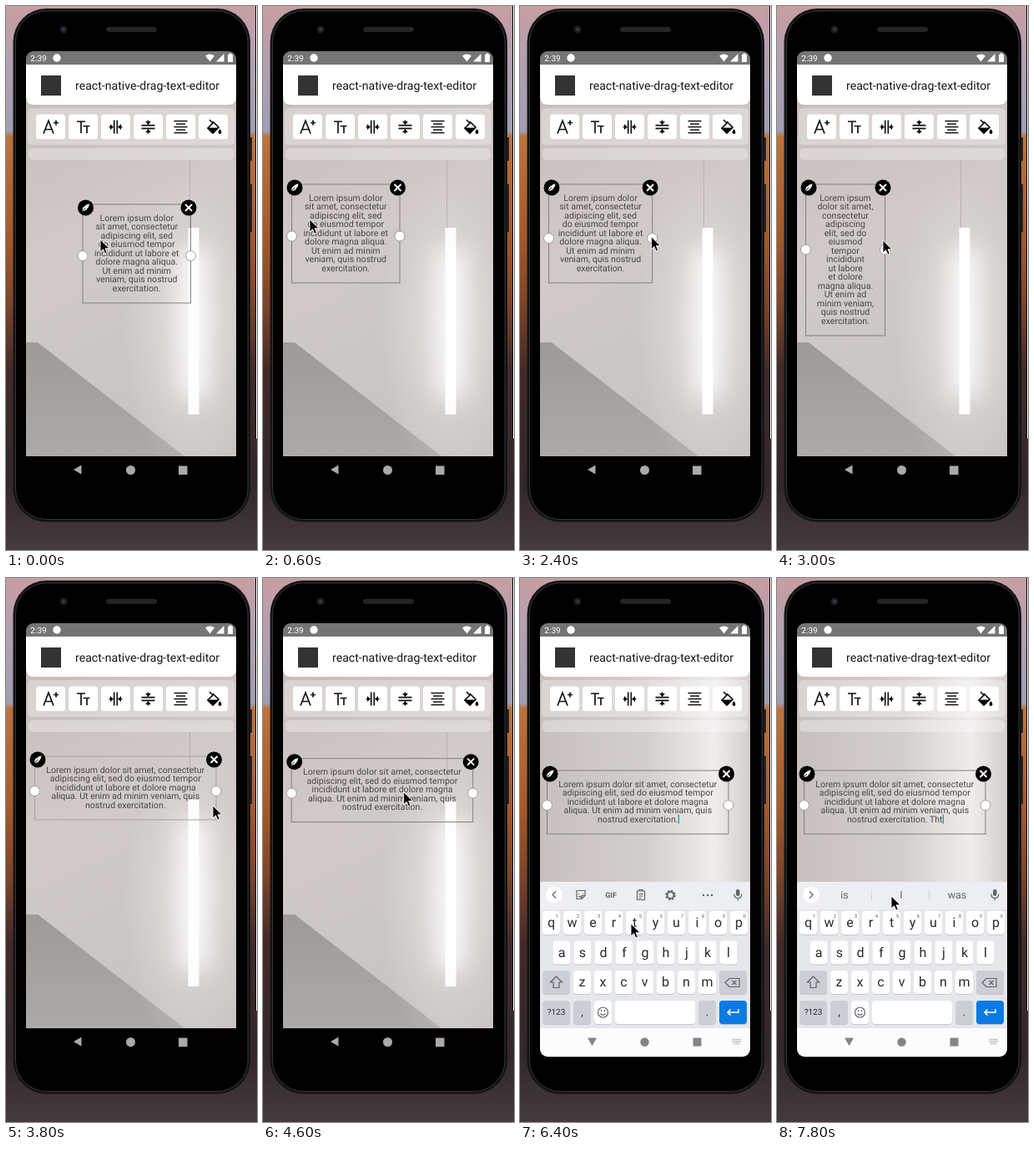
An HTML page that plays this animation: 301x650 px, repeating every 8000 ms.

```html
<!DOCTYPE html>
<html lang="en">
<head>
<meta charset="utf-8">
<title>Drag text editor</title>
<style>
html, body { margin: 0; width: 100%; height: 100%; overflow: hidden; background: #000; }
svg { display: block; width: 100vw; height: 100vh; font-family: Roboto, "Open Sans", sans-serif; }
text { text-anchor: middle; white-space: pre; text-rendering: geometricPrecision; }
#copy { font-size: 10.57px; fill: #4a4746; }
.line { fill: none; stroke: #111; stroke-width: 1.7; }
.thin { fill: none; stroke: #5f6368; stroke-width: 1.2; }
</style>
</head>
<body>
<svg viewBox="0 0 301 650" preserveAspectRatio="none">
  <defs>
    <linearGradient id="dusk" x2="0" y2="1">
      <stop offset="0" stop-color="#c79ea2"/><stop offset=".1" stop-color="#b3a0b0"/>
      <stop offset=".23" stop-color="#a09eb2"/><stop offset=".24" stop-color="#bd733c"/>
      <stop offset=".42" stop-color="#a55a2b"/><stop offset=".55" stop-color="#7c4429"/>
      <stop offset=".67" stop-color="#432a28"/><stop offset=".88" stop-color="#32272a"/>
      <stop offset="1" stop-color="#453b3d"/>
    </linearGradient>
    <linearGradient id="wall" x2=".25" y2="1">
      <stop offset="0" stop-color="#c4bcb9"/><stop offset=".5" stop-color="#d0cac8"/>
      <stop offset="1" stop-color="#c8c4c2"/>
    </linearGradient>
    <linearGradient id="wedge" x2="0" y2="1">
      <stop offset="0" stop-color="#9d9a98"/><stop offset="1" stop-color="#acaaa8"/>
    </linearGradient>
    <radialGradient id="glow">
      <stop offset="0" stop-color="#fff" stop-opacity=".45"/>
      <stop offset="1" stop-color="#fff" stop-opacity="0"/>
    </radialGradient>
    <filter id="blur" filterUnits="userSpaceOnUse" x="100" y="180" width="250" height="370">
      <feGaussianBlur stdDeviation="13"/>
    </filter>
    <linearGradient id="soft">
      <stop offset="0" stop-color="#c7c1be"/><stop offset=".5" stop-color="#d3cecc"/>
      <stop offset=".83" stop-color="#efeceb"/><stop offset="1" stop-color="#d3cecc"/>
    </linearGradient>
    <clipPath id="screen"><rect x="24" y="54" width="252" height="518" rx="9"/></clipPath>
    <clipPath id="photo"><rect x="24" y="70" width="252" height="468"/></clipPath>
  </defs>

  <rect width="301" height="650" fill="url(#dusk)"/>
  <path d="M299 0h1v517h-1z"/><path d="M300 0h1v517h-1z" fill="#fff"/>
  <path d="M292 157h3v28h-3zM292 213h3v57h-3z" fill="#222226"/>
  <rect x="8.500" y="3" width="284.500" height="613.500" rx="40" fill="#141416"/>
  <rect x="11.500" y="6" width="278.500" height="607.500" rx="37" fill="#000" stroke="#333439"/>
  <rect x="120" y="25" width="61" height="6" rx="3" fill="#242426"/>
  <circle cx="69" cy="28" r="4.500" fill="#1c1d22"/><circle cx="69" cy="28" r="2" fill="#343944"/>

  <g clip-path="url(#screen)">
    <g clip-path="url(#photo)">
      <path d="M24 70h252v468H24z" fill="url(#wall)"/>
      <path d="M24 402h14L214 538H24z" fill="url(#wedge)"/>
      <ellipse cx="224" cy="385" rx="85" ry="185" fill="url(#glow)"/>
      <path d="M225 290V468" stroke="#fff" stroke-opacity=".8" stroke-width="36" filter="url(#blur)"/>
      <path d="M220.500 184v82" stroke="#b0aaa7" stroke-width=".8"/>
      <rect x="218.500" y="265" width="13" height="223" fill="#fdfdfd"/>
      <path id="dim" d="M24 70h252v468H24z" fill="url(#soft)"/>
    </g>
    <path d="M24 54h252v32H24z" fill="#757575"/>
    <g fill="#fff">
      <text x="39" y="65.500" font-size="10">2:39</text>
      <circle cx="61" cy="62" r="4.700"/>
      <path d="M239 59.500q5.500-4 11 0l-5.500 7zM252 66.500l9.500-9.500v9.500zM266 58h1.500v-1.500h3V58h1.500v9h-6z"/>
      <path d="M24 70h252v38q0 10-10 10H34q-10 0-10-10z"/>
    </g>
    <rect x="42" y="83" width="24" height="24" fill="#333"/>
    <text x="169.500" y="100" font-size="14.100" fill="#161616">react-native-drag-text-editor</text>

    <rect x="26" y="122" width="248" height="44" rx="5" fill="#fff" fill-opacity=".3"/>
    <rect x="27" y="170" width="246" height="14" rx="5" fill="#fff" fill-opacity=".3"/>
    <g id="tools"></g>
    <g transform="translate(53.500 144.500)">
      <path class="line" d="M-8.500 8L-2.500-7.500 3.500 8M-6.500 3h8M6.500-8v6M3.500-5h6"/>
    </g>
    <g transform="translate(92.500 144.500)">
      <path class="line" d="M-7.500-6.500h10M-2.500-6.500V7.500M0-1h8M4.500-1V7.500"/>
    </g>
    <g id="spread" transform="translate(131.500 144.500)">
      <path class="line" d="M-1.800-8V8M1.800-8V8M-8 0h5M3 0h5"/>
      <path d="M-3 0l-3.500-3.500v7zM3 0l3.500-3.500v7z"/>
    </g>
    <use href="#spread" transform="translate(315 13) rotate(90)"/>
    <path class="line" d="M201.500 137.500h16M204 141h11M201.500 144.500h16M204 148h11M201.500 151.500h16"/>
    <path class="line" d="M244 136l4 4-6 6 6 6 7-7-7-7"/>
    <path d="M241 145.500h14l-6.500 6.500zM256.500 147q4 5 0 6-4-1 0-6z"/>

    <g id="box">
      <rect id="frame" fill="none"/>
      <text id="copy"></text>
      <path id="caret" stroke="#1695a3" stroke-width="1.200"/>
      <g id="pen">
        <circle r="9.500"/>
        <path d="M-5 5l1.500-5.500L1-4 4.500-5 5-4.500 4-1 .5 3.500zM-5 5L0 0" fill="#fff" stroke="#000" stroke-width=".9"/>
      </g>
      <g id="close"><circle r="9.500"/><path d="M-4-4l8 8M4-4l-8 8" stroke="#fff" stroke-width="2"/></g>
      <circle id="left" r="6" fill="#fff" stroke="#8d8987" stroke-width=".8"/>
      <circle id="right" r="6" fill="#fff" stroke="#8d8987" stroke-width=".8"/>
    </g>

    <g id="nav" fill="#a9a9a9">
      <path d="M24 538h252v40H24z" fill="#000"/>
      <path d="M81 554l9.500-5.500v11z"/><circle cx="149.500" cy="554.500" r="5.500"/><path d="M207 549.500h10.500v10.500H207z"/>
    </g>
    <g id="keyboard">
      <path d="M24 363h252v180H24z" fill="#e5e7eb"/>
      <path d="M24 363h252v33H24z" fill="#eceef1"/>
      <circle cx="41" cy="378.500" r="10" fill="#fff"/>
      <path id="chevron" class="thin"/>
      <g id="toolbar" class="thin">
        <path d="M68 373.500h10v6l-4 4h-6zM78 379.500h-4v4M70.500 377v1M75.500 377v1M70.500 380q2 2 4 0"/>
        <text x="109" y="382" font-size="9" font-weight="700" fill="#5f6368" stroke="none">GIF</text>
        <path d="M140.500 374h9v10.500h-9zM143 374v-1.500h4v1.500M142.500 377.500h5M142.500 380h5M142.500 382.500h3"/>
        <circle cx="180.500" cy="379" r="4" stroke-width="2"/>
        <circle cx="180.500" cy="379" r="5.500" stroke-width="1.500" stroke-dasharray="2.300 2.020"/>
        <path d="M220 379h12" stroke-width="2.400" stroke-linecap="round" stroke-dasharray="0 5"/>
      </g>
      <g id="hints" font-size="12.500" fill="#5f6368">
        <text x="81" y="383">is</text><text x="149" y="383">I</text><text x="216" y="383">was</text>
        <path d="M113.500 372v14M182.500 372v14" stroke="#d2d5d9"/>
      </g>
      <rect x="259" y="372" width="4.500" height="8" rx="2.200" fill="#5f6368"/>
      <path class="thin" d="M256.800 377.500q0 5 4.500 5t4.500-5M261.300 382.500v3"/>
      <g id="keys"></g>
      <path class="thin" d="M43.500 476l-7 7h3.500v6.500h7V483h3.500zM251 478.500h12v10h-12l-5-5zM254.500 481l5 5M259.500 481l-5 5"/>
      <circle class="thin" cx="99.500" cy="519" r="6"/>
      <path class="thin" d="M97.500 516v2M101.500 516v2M96.500 520.500q3 3.500 6 0"/>
      <path d="M262 515v4h-13M252.500 515.500l-3.500 3.500 3.500 3.500" fill="none" stroke="#fff" stroke-width="1.500"/>
      <path d="M24 538h252v40H24z" fill="#fcfcfc"/>
      <g fill="#858585">
        <path d="M81 549.500h11l-5.500 9.500z"/><circle cx="149.500" cy="554.500" r="5.200"/>
        <path d="M207.500 549.500H217.500v10H207.500z"/>
      </g>
      <path d="M254.500 551.500h11M254.500 554h11M256.500 556.500h7" stroke="#aaa" stroke-width="1.400" stroke-dasharray="1.500 .7"/>
    </g>
  </g>
  <path id="cursor" d="M0 0v15l3.500-3.300 2.300 5.300 2.500-1-2.300-5.200H11z" stroke="#fff" stroke-width=".9"/>
</svg>
<script>
const $ = id => document.getElementById(id);
const LOOP = 8000, STEP = 200, LEADING = 10.5;

// Text layouts: widest box width for which each applies, then its lines.
const LAYOUTS = [
  [108, "Lorem ipsum|dolor sit amet,|consectetur|adipiscing|elit, sed do|eiusmod|tempor|incididunt|ut labore|et dolore|magna aliqua.|Ut enim ad|minim veniam,|quis nostrud|exercitation."],
  [148, "Lorem ipsum dolor|sit amet, consectetur|adipiscing elit, sed|do eiusmod tempor|incididunt ut labore et|dolore magna aliqua.|Ut enim ad minim|veniam, quis nostrud|exercitation."],
  [195, "Lorem ipsum dolor sit amet,|consectetur adipiscing elit,|sed do eiusmod tempor|incididunt ut labore et dolore|magna aliqua. Ut enim ad|minim veniam, quis nostrud|exercitation."],
  [999, "Lorem ipsum dolor sit amet, consectetur|adipiscing elit, sed do eiusmod tempor|incididunt ut labore et dolore magna|aliqua. Ut enim ad minim veniam, quis|nostrud exercitation."]
];

// time, cursor x, y, box x, y, width, side handle offset
const POSES = [
  [0, 113, 279, 92, 237, 129.5, 61.5],
  [600, 56, 255, 34.5, 213, 129.5, 62],
  [1000, 60, 256, 34.5, 213, 129.5, 62],
  [1800, 191, 272, 34.5, 213, 129.5, 62],
  [2200, 163, 275, 34.5, 213, 129.5, 62],
  [3000, 127, 280, 34.5, 213, 95, 78],
  [3800, 248, 272, 34.5, 213, 217.5, 41.5],
  [4400, 169, 253, 34.5, 213, 217.5, 41.5],
  [5200, 167, 270, 32.5, 230, 217.5, 41.5],
  [5600, 167, 270, 32.5, 230, 217.5, 41.5],
  [6400, 133, 413, 32.5, 230, 217.5, 41.5],
  [6800, 133, 413, 32.5, 230, 217.5, 41.5],
  [7800, 137, 380, 32.5, 230, 217.5, 41.5]
];

const move = (id, x, y) => $(id).setAttribute("transform", `translate(${x} ${y})`);
const show = (id, on) => $(id).setAttribute("visibility", on ? "visible" : "hidden");
const setAttrs = (id, attrs) => {
  for (const name in attrs) $(id).setAttribute(name, attrs[name]);
};

function poseAt(t) {
  const i = POSES.findIndex(p => p[0] > t);
  if (i < 0) return POSES[POSES.length - 1];
  const a = POSES[i - 1], b = POSES[i];
  const u = (t - a[0]) / (b[0] - a[0]), s = u * u * (3 - 2 * u);
  return a.map((v, k) => v + (b[k] - v) * s);
}

function key(x, y, w, label = "", fill = "#fff", size = 16) {
  return `<rect x="${x}" y="${y + 1}" width="${w}" height="28" rx="4" fill="#c3c6cb"/>
    <rect x="${x}" y="${y}" width="${w}" height="28" rx="4" fill="${fill}"/>
    <text x="${x + w / 2}" y="${y + 14 + size * .33}" font-size="${size}" fill="#27292c">${label}</text>`;
}

function buildKeys() {
  const row = (letters, x, y) => [...letters].map((c, i) => key(x + i * 25, y, 21, c)).join("");
  const digits = [..."1234567890"].map((d, i) =>
    `<text x="${44.5 + i * 25}" y="406" font-size="6" fill="#666">${d}</text>`).join("");
  const grey = "#cbcfd5";
  $("keys").innerHTML = row("qwertyuiop", 27, 398) + digits + row("asdfghjkl", 39.5, 433.5)
    + key(27, 469, 33, "", grey) + row("zxcvbnm", 64, 469) + key(239, 469, 33, "", grey)
    + key(27, 505, 33, "?123", grey, 10) + key(64, 505, 21, ",", grey, 13) + key(89, 505, 21)
    + key(114, 505, 96) + key(214, 505, 21, ".", grey, 13) + key(239, 505, 33, "", "#0b7be3");
  $("tools").innerHTML = [0, 1, 2, 3, 4, 5].map(i =>
    `<rect x="${36 + i * 39}" y="129.500" width="35" height="29.500" rx="3.500" fill="#fff"/>`).join("");
}

function drawBox(t, [, , , x, y, w, side]) {
  const typed = t < 6800 ? "" : t < 7000 ? " " : t < 7200 ? " T" : t < 7600 ? " Th" : " Tht";
  const lines = (LAYOUTS.find(l => w <= l[0])[1] + typed).split("|");
  const cx = x + w / 2, first = y + 19.5;
  $("copy").innerHTML = lines.map((s, i) =>
    `<tspan x="${cx}" y="${first + i * LEADING}">${s}</tspan>`).join("");
  const active = t < 800 || t >= 2200 && t < 3400 || t >= 4400;
  setAttrs("frame", { x, y, width: w, height: lines.length * LEADING + 23.4,
    stroke: active ? "#84807e" : "#a9a2a0" });
  move("pen", x + 3.5, y + 4);
  move("close", x + w - 2.5, y + 4);
  move("left", x, y + side);
  move("right", x + w, y + side);

  const end = cx + $("copy").lastChild.getComputedTextLength() / 2 + .8;
  const base = first + (lines.length - 1) * LEADING;
  setAttrs("caret", { d: `M${end} ${base - 9}v11` });
  show("caret", t >= 5600);
}

function draw(now) {
  const t = Math.floor(now % LOOP / STEP) * STEP;
  const pose = poseAt(t), typing = t >= 6800;
  drawBox(t, pose);
  move("cursor", pose[1], pose[2]);

  const rise = Math.min(1, Math.max(0, (t - 5600) / 400));
  move("keyboard", 0, (1 - rise) * 215);
  show("keyboard", rise > 0);
  show("dim", rise > 0);
  show("toolbar", rise > 0 && !typing);
  show("hints", typing);
  setAttrs("chevron", { d: typing ? "M39 374.500l4 4-4 4" : "M43 374.500l-4 4 4 4" });
  requestAnimationFrame(draw);
}

buildKeys();
requestAnimationFrame(draw);
</script>
</body>
</html>
```
